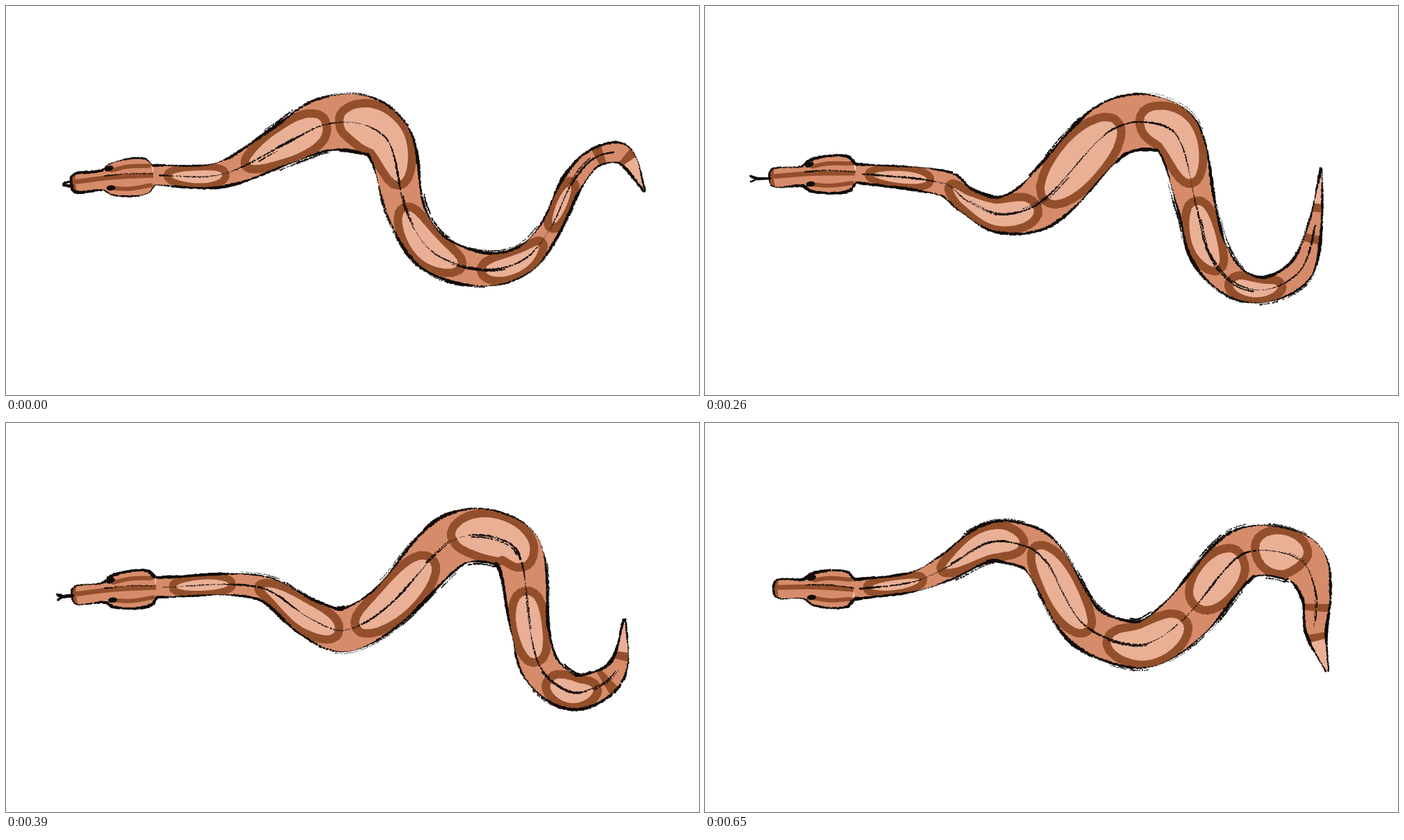
Animation, 998 px wide and 561 px high, one loop 0.78 s. Source, as an HTML page with a canvas:

```html
<!DOCTYPE html>
<html lang="en">
<head>
<meta charset="utf-8">
<title>Slithering snake</title>
<style>
  html, body { margin: 0; width: 100%; height: 100%; overflow: hidden; background: #fff; }
  canvas { display: block; }
</style>
</head>
<body>
<canvas id="stage" width="998" height="561"></canvas>
<script>
const ctx = document.getElementById('stage').getContext('2d');
const SKIN = '#d68c6b', LIGHT = '#e9b096', DARK = '#934f2b', INK = '#120d0a';
const HOLD = 130;

// nose; tongue as [length, spread at the mouth, spread at the tip];
// slide moves the markings along the body; spine holds x, y, half width.
const poses = [
  { nose: [95, 256], tongue: [12, 3, 1], slide: 1, spine: [
    212,244,14, 310,243,18, 400,200,29, 460,171,38, 515,171,41, 552,198,35, 577,298,27, 616,356,28,
    690,380,24, 745,366,20, 782,324,15, 815,256,15, 848,219,13, 888,214,14, 920,267,1] },
  { nose: [91, 256], tongue: [15, 8, 0], slide: 1.1, spine: [
    218,238,16, 320,240,15, 376,233,20, 440,204,26, 545,175,31, 608,190,33, 637,235,28, 661,328,29,
    704,373,25, 750,385,26, 810,362,28, 845,314,24, 874,222,14, 922,180,1] },
  { nose: [94, 248], tongue: [28, 0, 4], slide: 0.97, spine: [
    216,241,13, 345,256,18, 376,280,18, 425,301,26, 483,283,37, 578,184,40, 628,167,40, 679,186,35,
    708,290,27, 725,354,27, 763,399,22, 808,409,18, 856,383,18, 876,330,11, 888,235,1] },
  { nose: [96, 249], tongue: [22, 0, 4], slide: 1.05, spine: [
    216,237,14, 365,237,17, 440,283,27, 487,299,31, 548,266,31, 638,173,37, 688,162,38, 737,186,35,
    755,300,27, 772,356,27, 815,388,25, 862,374,20, 884,345,12, 891,282,1] },
  { nose: [103, 244], tongue: [0, 0, 0], slide: 1.07, spine: [
    220,251,14, 285,234,14, 350,224,20, 425,240,28, 512,305,30, 553,311,35, 613,283,32, 692,190,30,
    742,171,35, 797,188,32, 823,292,21, 842,335,21, 874,351,18, 902,333,10, 911,292,1] },
  { nose: [100, 239], tongue: [0, 0, 0], slide: 0.98, spine: [
    214,240,14, 300,229,14, 350,207,19, 402,175,26, 434,171,30, 482,190,30, 540,285,31, 587,313,32,
    637,318,34, 692,280,36, 768,193,36, 812,184,36, 861,201,34, 880,248,21, 880,300,15, 896,358,2] }
];
// Ringed markings along the body: centre and half length, in body lengths
const spots = [[0.065, 0.044], [0.21, 0.068], [0.372, 0.075], [0.545, 0.064], [0.69, 0.052], [0.805, 0.038]];
const bands = [0.9, 0.945];
// Half outline of the head: place from nose to nape, half width
const skull = [[0, 9], [0.07, 14], [0.37, 14], [0.47, 22], [0.7, 27], [0.92, 25], [1, 15]];

let seed = 1;
function rand() {
  seed = (Math.imul(seed, 1664525) + 1013904223) >>> 0;
  return seed / 4294967296;
}

const dist = (a, b) => Math.hypot(b[0] - a[0], b[1] - a[1]);

// Smooth curve through the points, sampled about every 1.2 px
function curve(p) {
  const out = [], last = p.length - 1;
  const slope = (i, k) => {
    const a = p[Math.max(0, i - 1)], b = p[Math.min(last, i + 1)];
    return (b[k] - a[k]) / ((i > 0 ? dist(a, p[i]) : 0) + (i < last ? dist(p[i], b) : 0) || 1);
  };
  for (let i = 0; i < last; i++) {
    const len = dist(p[i], p[i + 1]), steps = Math.ceil(len / 1.2);
    for (let s = 0; s < steps; s++) {
      const t = s / steps, r = 1 - t;
      out.push(p[i].map((a, k) => a * r * r * (1 + 2 * t) + p[i + 1][k] * t * t * (3 - 2 * t) +
        len * t * r * (slope(i, k) * r - slope(i + 1, k) * t)));
    }
  }
  out.push(p[last]);
  return out;
}

function trace(pts) {
  ctx.beginPath();
  pts.forEach(([x, y]) => ctx.lineTo(x, y));
}

function fill(pts, color) {
  trace(pts);
  ctx.closePath();
  ctx.fillStyle = color;
  ctx.fill();
}

function line(pts, color, width) {
  trace(pts);
  ctx.strokeStyle = color;
  ctx.lineWidth = width;
  ctx.stroke();
}

// Dry pencil line: grains of varying size with gaps
function ink(pts, width, gaps = 0.04) {
  const phase = rand() * 9;
  const jitter = () => (rand() - 0.5) * 1.1;
  ctx.fillStyle = INK;
  pts.forEach(([x, y], i) => {
    if (rand() < gaps) return;
    const swell = 0.85 + 0.3 * Math.sin(i * 0.035 + phase) + 0.2 * Math.sin(i * 0.11 + phase);
    const w = Math.max(0.9, width * swell * (0.75 + 0.5 * rand()));
    ctx.fillRect(x - w / 2 + jitter(), y - w / 2 + jitter(), w, w);
  });
}

// Body samples with unit normals; at() gives a point across the body
function makeBody(flat) {
  const keys = [];
  for (let i = 0; i < flat.length; i += 3) keys.push(flat.slice(i, i + 3));
  const rows = curve(keys), n = rows.length - 1;
  const at = (u, across, extra = 0) => {
    const i = Math.round(Math.max(0, Math.min(1, u)) * n);
    const a = rows[Math.max(0, i - 2)], b = rows[Math.min(n, i + 2)];
    const [x, y, w] = rows[i], l = dist(a, b) || 1, off = w * across + extra;
    return [x + (b[1] - a[1]) / l * off, y - (b[0] - a[0]) / l * off];
  };
  const run = (from, to, across, extra) => {
    const count = Math.ceil((to - from) * n);
    return Array.from({ length: count + 1 }, (_, i) => at(from + (to - from) * i / count, across, extra));
  };
  const strip = (from, to) => run(from, to, 1).concat(run(from, to, -1).reverse());
  // Drops the folds an edge makes inside a tight bend
  const outside = pts => pts.filter(p => rows.every(r => dist(p, r) > r[2] - 2));
  return { at, run, strip, outside };
}

function drawBody(pose) {
  const body = makeBody(pose.spine);
  ctx.save();
  fill(body.strip(0, 1), SKIN);
  ctx.clip();
  fill(body.strip(bands[1], 1), LIGHT);
  for (const [mid, half] of spots) {
    const ring = [];
    for (let a = 0; a < 6.3; a += 0.05) {
      const s = Math.sin(a);
      ring.push(body.at(mid * pose.slide + half * Math.cos(a), 0.88 * Math.sign(s) * Math.abs(s) ** 0.85));
    }
    fill(ring, LIGHT);
    line(ring, DARK, mid < 0.1 ? 10 : 12);
  }
  bands.forEach(u => fill(body.strip(u - 0.006, u + 0.006), DARK));
  ctx.restore();

  ink(body.run(0.01, 0.92, 0), 2, 0.15);
  for (const side of [1, -1]) {
    ink(body.outside(body.run(0, 1, side)), 3);
    // Loose strokes that overshoot the edge or repeat the spine
    for (let k = 0; k < 13; k++) {
      const from = 0.12 + rand() * 0.78, len = 0.03 + rand() * 0.05;
      const inner = k > 9;
      const stroke = body.run(from, Math.min(0.98, from + len), inner ? 0 : side, side * (1 + rand() * 3));
      ink(inner ? stroke : body.outside(stroke), 1.6, 0.22);
    }
  }
}

function drawHead(pose) {
  const [x0, y0] = pose.nose, [x1, y1] = pose.spine;
  const len = Math.hypot(x1 - x0, y1 - y0), cos = (x1 - x0) / len, sin = (y1 - y0) / len;
  const put = (u, v) => [x0 + u * len * cos - v * sin, y0 + u * len * sin + v * cos];
  const path = list => curve(list.map(([u, v]) => put(u, v)));
  const half = side => skull.map(([u, v]) => [u, v * side]);
  const outline = path([...half(1).reverse(), ...half(-1)]);

  ctx.save();
  fill(outline, SKIN);
  ctx.clip();
  line(path([[0.06, -2], [0.5, -3], [1, 0]]), DARK, 7);
  for (const side of [-1, 1]) line(path([[0.5, 13 * side], [0.7, 16 * side], [0.96, 14 * side]]), DARK, 6);
  line(path([[0.03, -14], [0.02, 0], [0.03, 14]]), DARK, 5);
  ctx.restore();

  ink(path([[0.4, -6], [0.7, -6], [1, -2]]), 1.5, 0.2);
  ink(outline, 3);
  ctx.fillStyle = INK;
  for (const [v, turn] of [[-16, -0.4], [12, -0.1]]) {
    ctx.beginPath();
    ctx.ellipse(...put(0.47, v), 6.5, 3.8, turn, 0, 7);
    ctx.fill();
  }
  const [reach, root, fork] = pose.tongue;
  if (!reach) return;
  for (const side of [-1, 1]) {
    const out = reach / len;
    ink(path([[0, root * side], [-out * 0.65, root * 0.8 * side], [-out, fork * side]]), 2.8, 0);
  }
}

let shown = -1;
function tick() {
  const k = Math.floor(performance.now() / HOLD - start) % poses.length;
  if (k !== shown) {
    shown = k;
    seed = 71 + k * 977;
    ctx.fillStyle = '#fff';
    ctx.fillRect(0, 0, 998, 561);
    ctx.lineCap = ctx.lineJoin = 'round';
    drawBody(poses[k]);
    drawHead(poses[k]);
  }
  requestAnimationFrame(tick);
}
const start = performance.now() / HOLD;
tick();
</script>
</body>
</html>
```
